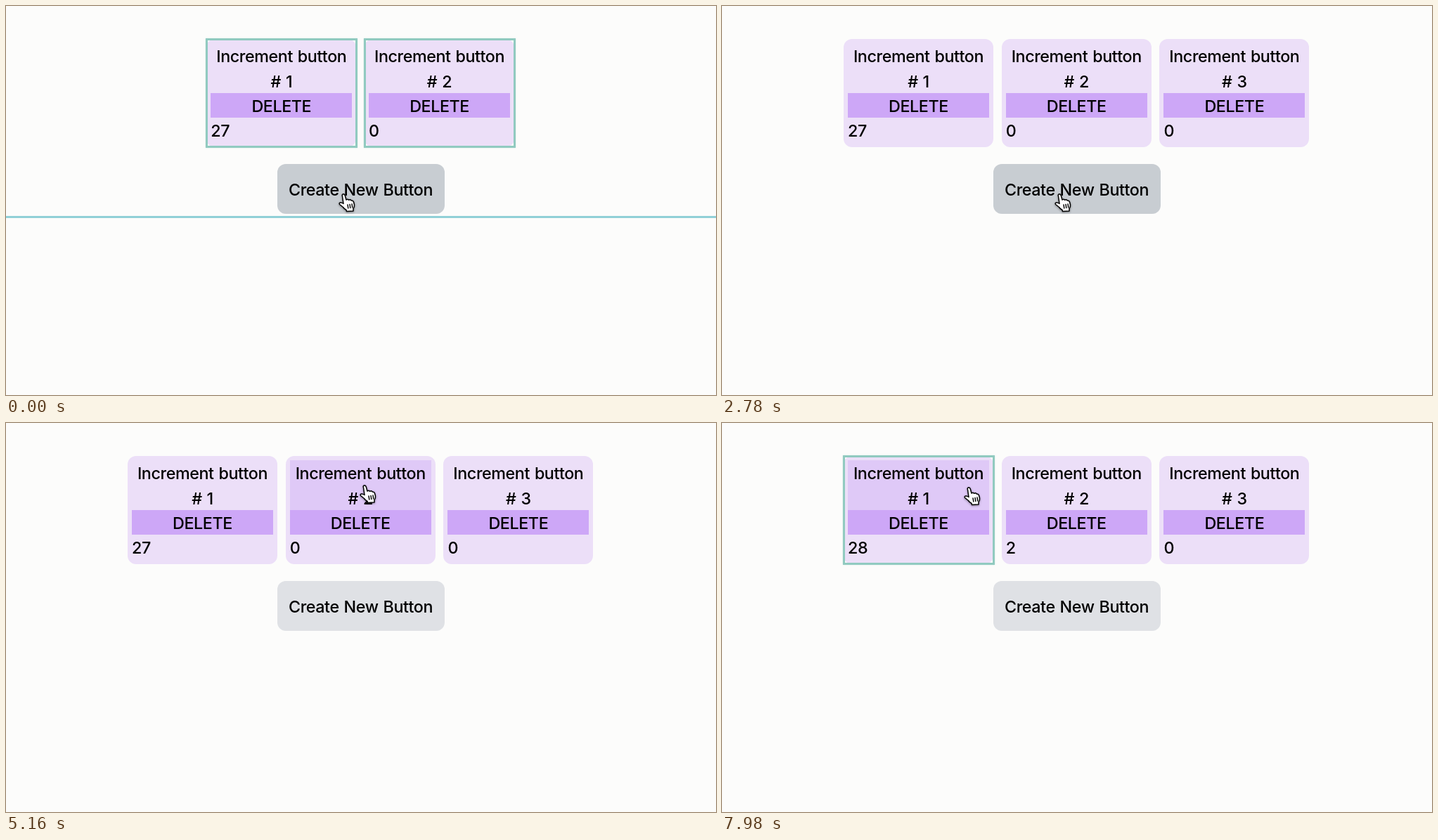
An HTML page for the animation above (8 s loop, 1010 px wide and 554 px high).

```html
<!DOCTYPE html>
<html lang="en">
<meta charset="utf-8">
<title>Increment buttons</title>
<style>
html, body { margin: 0; width: 100%; height: 100%; overflow: hidden; background: #fcfcfb; }
body { position: relative; font: 450 23.3px/35.4px Inter, sans-serif; letter-spacing: -.018em; word-spacing: .05em; color: #000; }
body > * { position: absolute; }
.card { top: 47px; width: 201px; height: 141.6px; padding: 6px; border-radius: 12px; background: #ecdff8; text-align: center; }
.card div { box-sizing: border-box; height: 35.4px; padding-top: 1.2px; }
.card .top { height: 70.8px; }
.card.hover .top { background: #dfc9f7; }
.delete { background: #cda7f7; }
.count { text-align: left; }
.card.lit::after { content: ""; position: absolute; inset: -1.5px; border: 3px solid #91cac0; box-shadow: 0 0 2px #91cac066; }
#create { left: 385.5px; top: 224.5px; width: 238px; height: 71px; line-height: 73px; border-radius: 12px; text-align: center; background: #dfe1e5; }
#create.hover { background: #c8cdd2; }
#line { left: 0; top: 298.5px; width: 100%; height: 3px; background: #91d0d7; }
svg { left: 0; top: 0; overflow: visible; filter: drop-shadow(0 1px 1.5px #0006); }
</style>
<body>
<div id="create">Create New Button</div>
<div id="line"></div>
<svg id="cursor" width="24" height="28" stroke-linejoin="round" stroke-linecap="round">
  <g id="hand" fill="#fff" stroke="#000" stroke-width="1.5">
    <path d="M5.5 4Q4.5 1 7 .8Q8.7 .8 9.3 3L11 9Q13.5 7.5 14.5 9.3Q17 8 18 10Q20.8 9.5 21.5 12L22.5 16Q23 19 21 21.5V25L11.5 25.5L11 23.5Q8 22 6.5 19.5L1.5 15.5Q.5 13.5 2.5 13Q4.5 12.5 7 14.5Z"/>
    <path d="M13 16l.8 5M16 15.5l.8 5M19 15l.8 5"/>
  </g>
  <path id="arrow" transform="translate(6 0)" d="M.5 .5V21L5.2 16.6L8.8 25L12.5 23.3L9 15.2H15.2Z" stroke="#fff" stroke-width="1.5"/>
</svg>
<script>
const LOOP = 8000, PITCH = 224.7, CENTER = 504.2, CARD_WIDTH = 213;
const $ = id => document.getElementById(id);

const cards = [1, 2, 3].map(number => {
  const card = document.createElement('div');
  card.className = 'card';
  card.innerHTML = `<div class="top">Increment button<br># ${number}</div>
    <div class="delete">DELETE</div><div class="count"></div>`;
  $('create').before(card);
  return card;
});

// Pointer stops: time, x, y
const path = [
  [0, 473, 267], [3060, 473, 267], [3380, 487, 168], [3700, 503, 88],
  [6880, 503, 88], [7320, 344, 91], [LOOP, 344, 91]
];
const within = (t, from, to) => t >= from && t < to;

function pointer(t) {
  const i = path.findIndex(stop => stop[0] > t);
  const [t0, x0, y0] = path[i - 1], [t1, x1, y1] = path[i];
  const p = (t - t0) / (t1 - t0), k = p * p * (3 - 2 * p);
  return [x0 + (x1 - x0) * k, y0 + (y1 - y0) * k];
}

function render(t) {
  const shown = t < 1800 ? 2 : 3;
  const allLit = within(t, 0, 400) || within(t, 1800, 2540);
  const lit = [
    t >= 7620,
    within(t, 5300, 5900) || within(t, 6120, 6760),
    false
  ];
  const counts = [t < 7620 ? 27 : 28, t < 5300 ? 0 : t < 6120 ? 1 : 2, 0];
  const [x, y] = pointer(t), tipX = x + 6;
  const onCreate = y > 224 && y < 295;
  let onCard = false;

  cards.forEach((card, i) => {
    const left = CENTER - CARD_WIDTH / 2 + (i - (shown - 1) / 2) * PITCH;
    const over = tipX > left + 6 && tipX < left + 207 && y > 53;
    const hover = over && y < 124;
    onCard ||= over && y < 159;
    card.hidden = i >= shown;
    card.style.left = left + 'px';
    card.classList.toggle('hover', hover);
    card.classList.toggle('lit', allLit || lit[i]);
    card.lastChild.textContent = counts[i];
  });

  $('create').classList.toggle('hover', onCreate);
  $('line').hidden = !allLit;
  $('hand').style.display = onCreate || onCard ? '' : 'none';
  $('arrow').style.display = onCreate || onCard ? 'none' : '';
  $('cursor').style.transform = `translate(${x}px, ${y}px)`;
}

function tick() {
  render(performance.now() % LOOP);
  requestAnimationFrame(tick);
}
tick();
</script>
</body>
</html>
```
